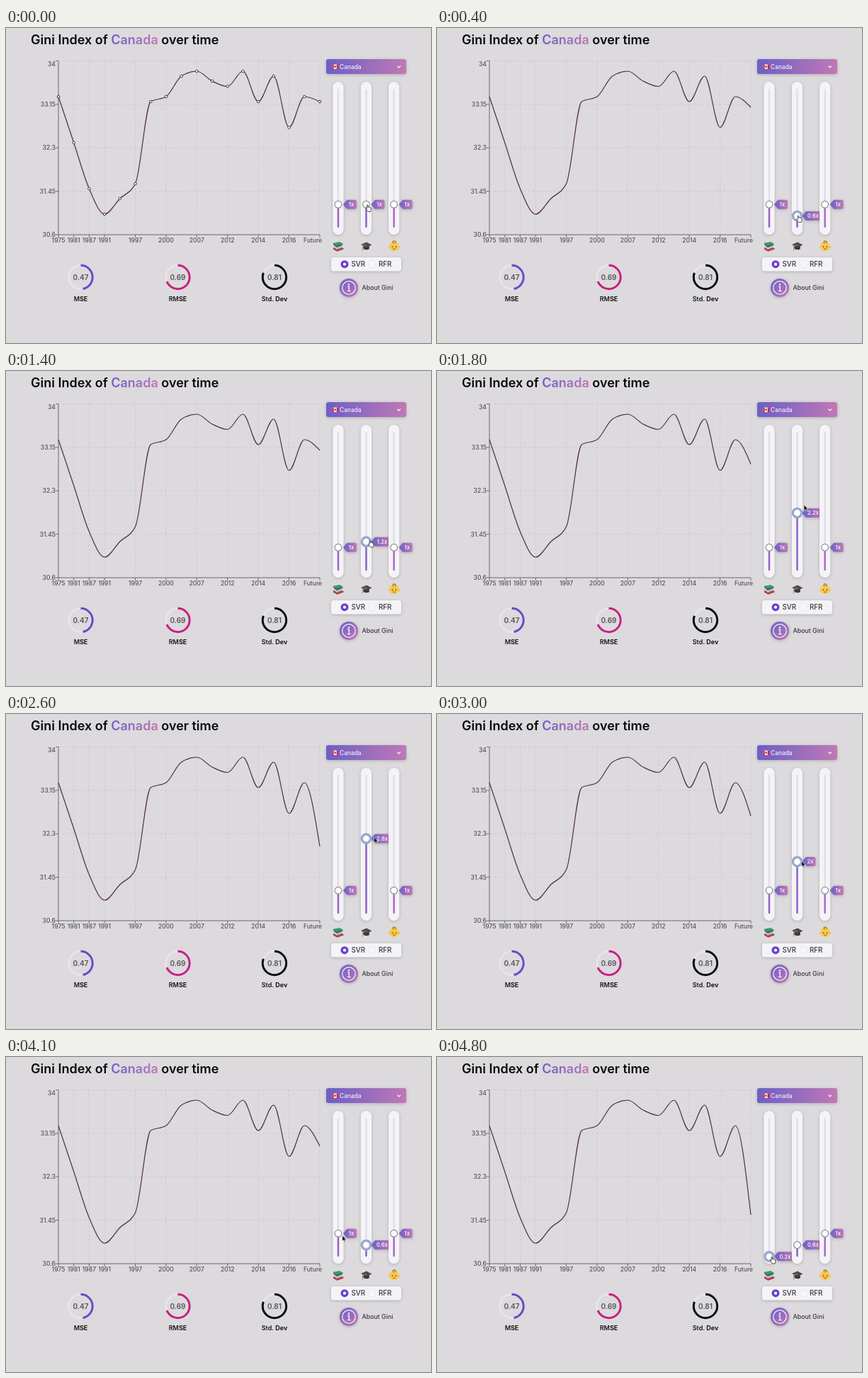
Write an HTML page that moves like this. It is 600 px wide and 445 px high and loops after 5 s.

```html
<!DOCTYPE html>
<html lang="en">
<head>
<meta charset="utf-8">
<title>Gini Index over time</title>
<style>
  html, body { margin: 0; width: 100%; height: 100%; overflow: hidden; background: #dcdadd; }
  svg { display: block; width: 600px; height: 445px; font-family: Inter, "Noto Sans", sans-serif; }
  .title { font-size: 18px; font-weight: 600; fill: #0b0a0c; }
  .axis { stroke: #6d6b6f; fill: none; }
  .grid { stroke: #cbc9cd; stroke-dasharray: 3 3; }
  .tick { font-size: 8.6px; font-weight: 500; fill: #555357; }
  .mid { text-anchor: middle; }
  .end { text-anchor: end; }
  .score { font-size: 10px; font-weight: 600; fill: #545257; text-anchor: middle; }
  .name { font-size: 9px; font-weight: 600; fill: #1a181c; text-anchor: middle; }
  .name tspan { font-weight: 700; }
  .badge text { font-size: 7.6px; font-weight: 500; fill: #fff; text-anchor: middle; }
  .soft { filter: drop-shadow(0 1px 2px #0003); }
  .option { font-size: 9.8px; font-weight: 500; fill: #3a383e; }
</style>
</head>
<body>
<svg viewBox="0 0 600 445">
  <defs>
    <linearGradient id="brand"><stop stop-color="#6c5fc7"/><stop offset="1" stop-color="#c078b5"/></linearGradient>
    <linearGradient id="brandDown" x2="1" y2="1"><stop stop-color="#6c5fc7"/><stop offset="1" stop-color="#c078b5"/></linearGradient>
  </defs>

  <text class="title" x="35" y="23">Gini Index of <tspan fill="url(#brand)" id="country">Canada</tspan> over time</text>

  <g id="chart"></g>
  <path id="curve" fill="none" stroke="#512c49" stroke-width="1.2"/>
  <g id="dots" fill="#fff" stroke="#512c49"></g>
  <g id="gauges"></g>

  <rect class="soft" x="452" y="44" width="113" height="21" rx="3" fill="url(#brand)"/>
  <g transform="translate(460.5 51.5)">
    <rect width="8.5" height="6.5" rx="1" fill="#f4eef0"/>
    <path d="M0 0h2.2v6.5H0zM6.3 0h2.2v6.5H6.3zM4.25 1.2l.6 1 .9.1-.6 1.2.3.8-1.2.1v1l-.1-1-1.2-.1.3-.8-.6-1.2.9-.1z" fill="#d3253a"/>
  </g>
  <text x="471" y="58" font-size="8.4" font-weight="500" fill="#f3effa">Canada</text>
  <path d="M552.3 53.6l2.4 2.4 2.4-2.4" fill="none" stroke="#fff" stroke-width="1.1"/>

  <g id="sliders"></g>

  <g id="books" transform="translate(461 301)" stroke-linejoin="round">
    <path d="M1 9.5l9-2 5.5 2.6-9 3.4z" fill="#c9434b"/>
    <path d="M1 9.5l5.5 4v1.3L1 11.6zM6.5 13.5l9-3.4v1.4l-9 3.3z" fill="#8d2f3b"/>
    <path d="M1.5 6l9-2.2 4 2.7-8.5 3z" fill="#4a84bd"/>
    <path d="M1.5 6l4.5 3.5 8.5-3v1.7L6 11.4 1.5 8.2z" fill="#d9d6cd"/>
    <path d="M1 2.8L10 1l4.5 2.5-9 3z" fill="#3f9a67"/>
    <path d="M1 2.8l4.5 3.7 9-3V5l-9 3.2L1 4.8z" fill="#28714b"/>
  </g>
  <g transform="translate(500.5 301)">
    <path d="M4 6.5v4.2q4 3 8.3.6V6.5z" fill="#37363b"/>
    <path d="M.5 5L8.5 1.5 16 5.6 8.2 9.2z" fill="#4b494f"/>
    <path d="M8.4 5.3L3 7.4v6.3" fill="none" stroke="#a98b4d"/>
  </g>
  <g transform="translate(548 308.5)">
    <circle cx="-6.4" cy="1.2" r="1.6" fill="#f0b93c"/><circle cx="6.4" cy="1.2" r="1.6" fill="#f0b93c"/>
    <circle r="6.7" fill="#f7c94c"/>
    <path d="M-1-4Q-3-8 .5-7.6 4-6 1-4.8" fill="none" stroke="#a9702c" stroke-width="1.3"/>
    <circle cx="-2.5" cy=".6" r=".9" fill="#5b3b1e"/><circle cx="2.5" cy=".6" r=".9" fill="#5b3b1e"/>
    <path d="M-2 3.2q2 1.7 4 0" fill="none" stroke="#8a4b22" stroke-width=".9"/>
  </g>

  <rect class="soft" x="459" y="324" width="99" height="19.5" rx="3.5" fill="#f4f3f6"/>
  <circle cx="478" cy="333.7" r="3.8" fill="#fff" stroke="#6a42cb" stroke-width="3.4"/>
  <circle cx="517" cy="333.7" r="5" fill="#f7f6f8" stroke="#e6e4e9" stroke-width=".8"/>
  <text class="option" x="487.5" y="337.3">SVR</text>
  <text class="option" x="526" y="337.3">RFR</text>

  <circle class="soft" cx="484" cy="367" r="13" fill="url(#brandDown)"/>
  <circle cx="484" cy="367" r="9.3" fill="none" stroke="#f3effa" stroke-width="1.3"/>
  <path d="M482.3 365.3h2v6M481.8 371.6h4.8" fill="none" stroke="#f3effa" stroke-width="1.4"/>
  <circle cx="484" cy="362.2" r="1.2" fill="#f3effa"/>
  <text x="502.5" y="370.3" font-size="8.8" font-weight="500" fill="#3a383e">About Gini</text>

  <g id="arrow"><path d="M0 0v8.2l1.9-1.7 1.3 2.9 1.4-.6-1.3-2.8h2.6z" fill="#111" stroke="#fff" stroke-width=".6"/></g>
  <g id="hand"><path d="M.4.9Q1.2-.4 2 .9v3l.6-.7q.9-.2 1.1.6.9-.5 1.4.4 1-.2 1.2.7v2.3L5.6 10H2.2L-.9 6.5q0-1.2 1.3-.6z" fill="#fff" stroke="#222" stroke-width=".8" stroke-linejoin="round"/></g>
</svg>

<script>
const LOOP = 5000, TICK = 100;
const LEFT = 74, RIGHT = 443, TOP = 46.5, BOTTOM = 292, BASE = 282;
const $ = id => document.getElementById(id);

function add(parent, tag, attrs, text) {
  const el = document.createElementNS('http://www.w3.org/2000/svg', tag);
  for (const k in attrs) el.setAttribute(k, attrs[k]);
  if (text) el.textContent = text;
  parent.appendChild(el);
  return el;
}

// Linear interpolation over keys of the form [time, ...values]
function at(keys, t) {
  const i = keys.findIndex(k => k[0] > t);
  if (i < 0) return keys[keys.length - 1].slice(1);
  if (i === 0) return keys[0].slice(1);
  const a = keys[i - 1], b = keys[i], f = (t - a[0]) / (b[0] - a[0]);
  return a.slice(1).map((v, j) => v + (b[j + 1] - v) * f);
}

// Chart
const heights = [97, 162, 227, 263, 241, 220, 104, 97, 68, 61, 75, 82.5, 61, 104, 68, 140.5, 97, 104];
const step = (RIGHT - LEFT) / (heights.length - 1);
const px = i => LEFT + i * step;
const years = { 0: '1975', 1: '1981', 2: '1987', 3: '1991', 5: '1997', 7: '2000', 9: '2007', 11: '2012', 13: '2014', 15: '2016', 17: 'Future' };
const levels = ['34', '33.15', '32.3', '31.45', '30.6'];

levels.forEach((label, i) => {
  const y = TOP + i * (BOTTOM - TOP) / 4;
  add($('chart'), 'path', { class: 'grid', d: `M${LEFT} ${y}H${RIGHT}` });
  add($('chart'), 'path', { class: 'axis', d: `M${LEFT - 4} ${y}h4` });
  add($('chart'), 'text', { class: 'tick end', x: 70, y: i ? y + 3.2 : 53.5 }, label);
});
for (const i in years) {
  const x = px(i);
  add($('chart'), 'path', { class: 'grid', d: `M${x} ${TOP}V${BOTTOM}` });
  add($('chart'), 'path', { class: 'axis', d: `M${x} ${BOTTOM}v4` });
  add($('chart'), 'text', { class: 'tick mid', x: Math.min(x, 433), y: 303 }, years[i]);
}
add($('chart'), 'path', { class: 'axis', d: `M${LEFT} ${TOP}V${BOTTOM}H${RIGHT}` });
heights.forEach((y, i) => add($('dots'), 'circle', { cx: px(i), cy: y, r: 1.8 }));

// Monotone cubic through the points
function curve(ys) {
  const n = ys.length - 1;
  const s = ys.slice(1).map((y, i) => (y - ys[i]) / step);
  const m = ys.map((_, i) => i === 0 || i === n ? 0 :
    (Math.sign(s[i - 1]) + Math.sign(s[i])) *
    Math.min(Math.abs(s[i - 1]), Math.abs(s[i]), Math.abs(s[i - 1] + s[i]) / 4));
  m[0] = (3 * s[0] - m[1]) / 2;
  m[n] = (3 * s[n - 1] - m[n - 1]) / 2;
  const h = step / 3;
  let d = `M${px(0)} ${ys[0]}`;
  for (let i = 0; i < n; i++)
    d += `C${px(i) + h} ${ys[i] + m[i] * h} ${px(i + 1) - h} ${ys[i + 1] - m[i + 1] * h} ${px(i + 1)} ${ys[i + 1]}`;
  return d;
}

// Gauges
[[105.5, 0.47, '#6a48c9', 'M', 'SE'], [242.5, 0.69, '#c71f80', 'RM', 'SE'], [379, 0.81, '#0c0b0d', 'Std. ', 'Dev']]
  .forEach(([x, value, color, head, tail]) => {
    const g = $('gauges'), ring = { cx: x, cy: 352, r: 16.7, fill: 'none', 'stroke-width': 3 };
    add(g, 'circle', { ...ring, stroke: '#e6e4e8' });
    add(g, 'circle', { ...ring, stroke: color, pathLength: 1, 'stroke-dasharray': `${value} 1`, transform: `rotate(-90 ${x} 352)` });
    add(g, 'text', { class: 'score', x, y: 355.6 }, String(value));
    add(add(g, 'text', { class: 'name', x, y: 386 }, head), 'tspan', {}, tail);
  });

// Sliders
const sliders = [469, 508.5, 547.7].map((x, i) => {
  const g = add($('sliders'), 'g', {});
  add(g, 'rect', { class: 'soft', x: x - 7.6, y: 76, width: 15.2, height: 216, rx: 7.6, fill: '#f4f3f6' });
  add(g, 'rect', { x: x - 1.2, y: 86, width: 2.4, height: BASE - 86, rx: 1.2, fill: '#e0dee8' });
  const fill = add(g, 'rect', { x: x - 1.2, width: 2.4, rx: 1, fill: ['#9660c2', '#8862c6', '#ad66c8'][i] });
  const badge = add(g, 'g', { class: 'badge' });
  const shape = add(badge, 'path', { class: 'soft', fill: 'url(#brand)' });
  const label = add(badge, 'text', { y: 2.7 });
  const halo = add(g, 'circle', { cx: x, r: 6.3, fill: 'none', stroke: '#92a6cd', 'stroke-width': 3 });
  const thumb = add(g, 'circle', { cx: x, r: 4.9, fill: '#fff', 'stroke-width': 1.2 });
  return { x, fill, badge, shape, label, halo, thumb };
});
const thumbY = v => 249.3 - (v - 1) * 40.7;

function setSlider(s, v, focused) {
  const y = thumbY(v), text = +v.toFixed(1) + 'x', w = 11 + 4 * text.length;
  s.fill.setAttribute('y', y);
  s.fill.setAttribute('height', Math.max(0, BASE - y));
  s.badge.setAttribute('transform', `translate(${s.x + 7} ${y})`);
  s.shape.setAttribute('d', `M0 0L4.5-5.5Q5.2-6.5 6.5-6.5H${w - 2.5}q2.5 0 2.5 2.5V4q0 2.5-2.5 2.5H6.5Q5.2 6.5 4.5 5.5z`);
  s.label.setAttribute('x', 2 + w / 2);
  s.label.textContent = text;
  s.halo.setAttribute('cy', y);
  s.halo.style.display = focused ? '' : 'none';
  s.thumb.setAttribute('cy', y);
  s.thumb.setAttribute('stroke', focused ? '#a9b4cb' : '#8f8d94');
}

// Motion
const first = [[4250, 1], [4600, 0.2]];
const second = [[200, 1], [600, 0.2], [900, 0.2], [1200, 0.6], [1800, 2.2], [2300, 2.8], [2700, 2.8], [3300, 1.4], [3700, 0.6]];
const forecast = [[300, 104], [900, 152], [1200, 136], [1450, 106], [1500, 106], [1800, 131.5], [2300, 178],
  [2600, 187], [2800, 182], [3200, 106], [3300, 103.5], [3700, 106], [4100, 126], [4300, 128], [4800, 223]];
const pointer = [[200, 509, 249.5], [600, 508.5, 279.5], [900, 508.5, 279.5], [1200, 510, 264], [1800, 518, 189],
  [2300, 519.5, 174], [2650, 519.5, 174], [3300, 510.5, 236.5], [3700, 509, 266], [3850, 506, 265],
  [4100, 474.7, 252], [4250, 471, 250], [4600, 471.5, 282]];
const snap = v => Math.round(v * 5) / 5;

function draw() {
  const t = Math.floor(performance.now() % LOOP / TICK) * TICK;
  const values = [snap(at(first, t)[0]), snap(at(second, t)[0]), 1];
  const focus = t < 100 ? -1 : t < 4250 ? 1 : 0;
  sliders.forEach((s, i) => setSlider(s, values[i], i === focus));

  $('curve').setAttribute('d', curve([...heights.slice(0, -1), at(forecast, t)[0]]));
  $('dots').style.display = t < 300 ? '' : 'none';

  const [x, y] = at(pointer, t);
  const over = sliders.some((s, i) => Math.hypot(x - s.x, y - thumbY(values[i])) < 6);
  for (const id of ['arrow', 'hand']) {
    $(id).style.display = (id === 'hand') === over ? '' : 'none';
    $(id).setAttribute('transform', `translate(${x} ${y})`);
  }
  requestAnimationFrame(draw);
}

// The title gradient spans the country name only
const word = $('country'), from = word.getStartPositionOfChar(0).x;
add(document.querySelector('defs'), 'linearGradient', {
  id: 'wordFill', gradientUnits: 'userSpaceOnUse', x1: from, x2: from + word.getComputedTextLength(), y1: 0, y2: 0
}).innerHTML = $('brand').innerHTML;
word.setAttribute('fill', 'url(#wordFill)');

draw();
</script>
</body>
</html>
```
